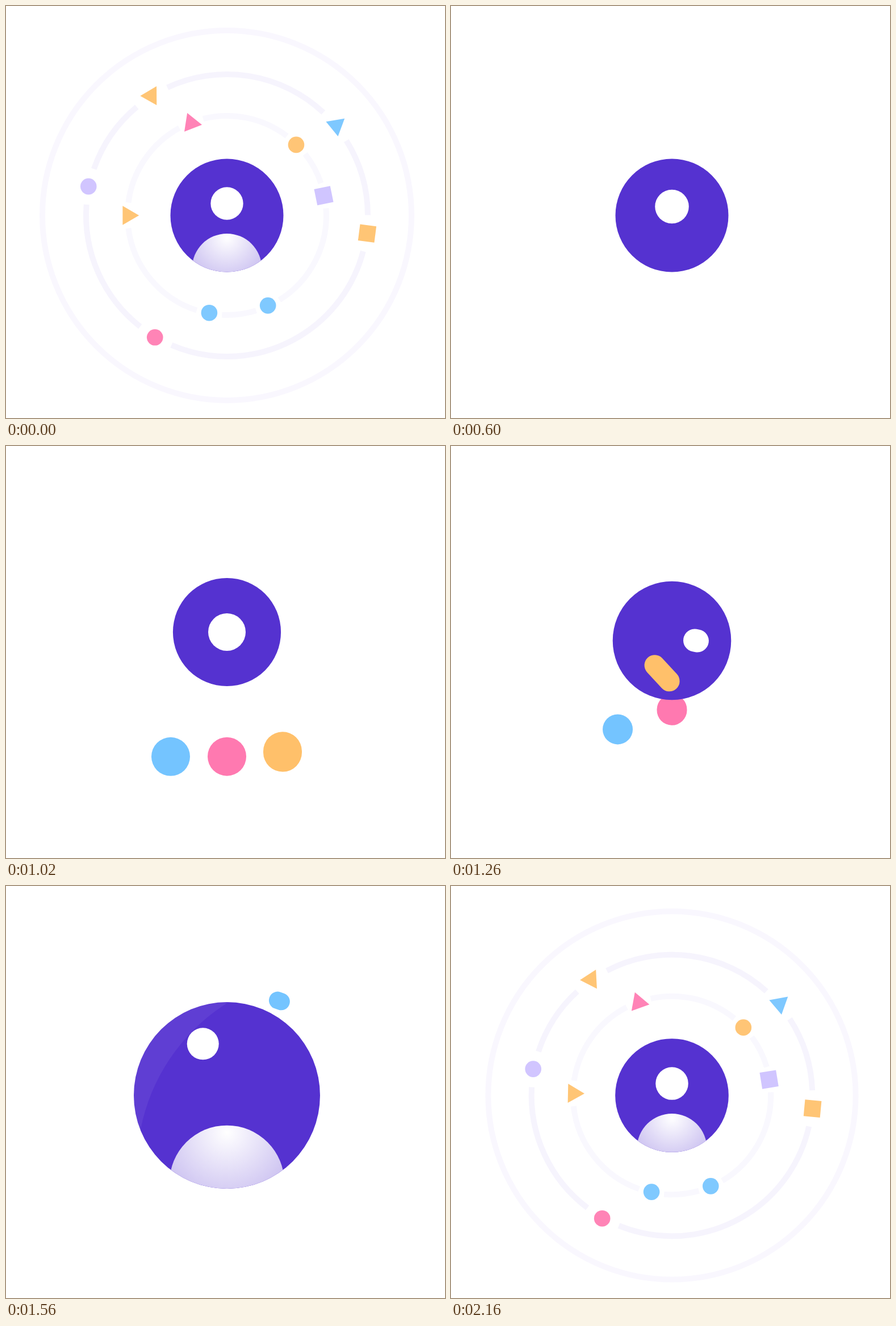
Recreate the animation shown at these times as an HTML page with a canvas. Size 773 px wide and 724 px high, loop 2220 ms.

```html
<!DOCTYPE html>
<html lang="en">
<head>
<meta charset="utf-8">
<title>Orbit loader</title>
<style>
html, body { margin: 0; width: 100%; height: 100%; overflow: hidden; background: #fff; }
canvas { display: block; }
</style>
</head>
<body>
<canvas id="stage" width="773" height="724"></canvas>
<script>
const ctx = document.getElementById('stage').getContext('2d');
const LOOP = 2220, STEP = 60;
const CX = 389, CY = 368, TAU = Math.PI * 2, RAD = Math.PI / 180;
const PURPLE = '#5532d0', YELLOW = '#ffc06a', PINK = '#ff79b0', BLUE = '#74c4ff', LILAC = '#cdc0ff';

const part = (t, from, to) => Math.min(Math.max((t - from) / (to - from), 0), 1);
const ramp = (t, from, to) => {
  const u = part(t, from, to);
  return u * u * (3 - 2 * u);
};
const mix = (a, b, u) => a + (b - a) * u;
const polar = (x, y, r, deg) => [x + r * Math.cos(deg * RAD), y + r * Math.sin(deg * RAD)];

// Orbit time: zero at the loop start, negative while the rings grow back.
const spin = t => {
  const u = t / 360;
  return u * (.75 - .637 * u + .887 * u * u);
};
const contract = t => t < 0 ? (t / 420) ** 2 : .15 * (t / 360) ** 2;

const rings = [
  { radius: 325, shrink: 72, alpha: .036, born: -510, gone: 480 },
  { radius: 248, shrink: 35, alpha: .052, born: -624, gone: 480 },
  { radius: 175, shrink: 37, alpha: .03, born: -720, gone: 330 }
];
const orbits = [null, { radius: 249, shrink: 17 }, { radius: 174, shrink: 30 }];
const radiusOf = (o, t) => o.radius - o.shrink * contract(t);

const shapes = [
  ['tri', YELLOW, 1, -122.4, 17.7, -410, 62],
  ['dot', LILAC, 1, 191.8, 7.1, -410],
  ['box', YELLOW, 1, 7.3, 13.4, -410],
  ['tri', BLUE, 1, -39.4, 6.4, -410],
  ['dot', PINK, 1, 120.6, 6.8, -435],
  ['tri', PINK, 2, -111.2, -9.7, -510],
  ['dot', YELLOW, 2, -45.5, -13.7, -410],
  ['box', LILAC, 2, -11.5, -15.2, -530],
  ['dot', BLUE, 2, 65.5, -8.9, -455],
  ['dot', BLUE, 2, 100.3, -11.3, -455],
  ['tri', YELLOW, 2, 180, -8.1, -475, 60]
].map(([kind, color, ring, angle, speed, born, turn = 0], i) =>
  ({ kind, color, ring, angle, speed, born, turn, pull: 360 + i * 3, fall: 170 }));
Object.assign(shapes[4], { pull: 69, fall: 330 });

const angleOf = (s, t) => s.angle + s.speed * spin(t);
const pullOf = (s, t) => 1 - part(t, s.pull, s.pull + s.fall) ** 1.5;
const placeOf = (s, t) => polar(CX, CY, radiusOf(orbits[s.ring], t) * pullOf(s, t), angleOf(s, t));

function disc(x, y, r, fill) {
  ctx.fillStyle = fill;
  ctx.beginPath();
  ctx.arc(x, y, r, 0, TAU);
  ctx.fill();
}

// A dot that stretches along its path once it moves fast enough.
function smear(path, t, r, color) {
  if (r <= 0) return;
  const [x, y] = path(t), a = path(t - 16), b = path(t + 16);
  const dx = b[0] - a[0], dy = b[1] - a[1], len = Math.hypot(dx, dy);
  const k = len > 13 ? (len - 13) / len / 2 : 0;
  ctx.strokeStyle = color;
  ctx.lineCap = 'round';
  ctx.lineWidth = r * 2;
  ctx.beginPath();
  ctx.moveTo(x - dx * k, y - dy * k);
  ctx.lineTo(x + dx * k + .02, y + dy * k);
  ctx.stroke();
}

function drawShape(s, t) {
  const alpha = .92 * part(t, s.born, s.born + 300) + .08 * part(t, 0, 300);
  const size = Math.min(1, pullOf(s, t) * 6);
  if (alpha <= 0 || size <= 0) return;
  ctx.globalAlpha = alpha;
  if (s.kind === 'dot') {
    smear(u => placeOf(s, u), t, 14.3 * size, s.color);
  } else {
    const [x, y] = placeOf(s, t), n = s.kind === 'tri' ? 3 : 4;
    const r = (n === 3 ? 19.2 : 20.4) * size * (t < 0 ? 1 + .33 * contract(t) : 1);
    const turn = angleOf(s, t) + s.turn + (n === 4 ? 45 : 0);
    ctx.fillStyle = s.color;
    ctx.beginPath();
    for (let i = 0; i < n; i++) ctx.lineTo(...polar(x, y, r, turn + i * 360 / n));
    ctx.fill();
  }
  ctx.globalAlpha = 1;
}

function drawRing(ring, index, t) {
  const alpha = ring.alpha * ramp(t, ring.born, ring.born + 300) * (1 - ramp(t, 0, ring.gone));
  if (alpha <= 0) return;
  const r = Math.max(radiusOf(ring, t), 0), gap = 7.4 * ramp(t, -420, -220);
  const stops = shapes.filter(s => s.ring === index)
    .map(s => (angleOf(s, t) + 720) % 360).sort((a, b) => a - b);
  ctx.strokeStyle = `rgba(85,50,206,${alpha})`;
  ctx.lineWidth = 10;
  ctx.lineCap = 'butt';
  ctx.beginPath();
  if (!stops.length || gap < .1) ctx.arc(CX, CY, r, 0, TAU);
  else stops.forEach((stop, i) => {
    const from = stop + gap, to = (stops[i + 1] ?? stops[0] + 360) - gap;
    if (to <= from) return;
    ctx.moveTo(...polar(CX, CY, r, from));
    ctx.arc(CX, CY, r, from * RAD, to * RAD);
  });
  ctx.stroke();
}

// The central disc hops up, then swells and settles.
const swell = t => t < 1560 ? ramp(t, 1200, 1560) : (1 - part(t, 1560, LOOP)) ** 2.2;
const discY = t => CY - 42 * ramp(t, 620, 1060) * (1 - ramp(t, 1050, 1550));
const discR = t => 99.5 + 64.5 * swell(t) - 4.5 * ramp(t, 600, 840) * (1 - ramp(t, 1000, 1240));

const settled = t => 1 - ramp(t, 480, 840) + ramp(t, 1580, 1820);
function headPath(t) {
  const out = 100 * ramp(t, 1140, 1407) * (1 - ramp(t, 1560, 1780));
  const lift = settled(t) * (21 - 16 * swell(t));
  return polar(CX, discY(t) - lift, out, -115 * ramp(t, 1260, 1560));
}
function headR(t) {
  const away = 33 - 13 * ramp(t, 1080, 1260) + 8 * ramp(t, 1260, 1560);
  return mix(away, .288 * discR(t), settled(t));
}

// Three balls drop out of the disc, bounce in a wave, and leave by their own routes.
const BALL = 34, REST = 524;
const shrinking = t => BALL - .0375 * Math.max(t - 1060, 0);
const balls = [
  { color: BLUE, x: 290, lag: 0, gone: 1640, front: t => t > 1350 && t < 1590,
    leave(t, p) {
      const u = ramp(t, 1250, 1580), join = ramp(t, 1080, 1240);
      const r = 183 + 8 * u - 28 * Math.sin(Math.PI * u);
      const q = polar(CX, discY(t), r, 121 + 180 * u);
      return [mix(p[0], q[0], join), mix(p[1], q[1], join)];
    },
    radius: shrinking },
  { color: PINK, x: 389, lag: 1.27, gone: 1400, front: () => false,
    leave: (t, p) => [p[0], mix(p[1], 380, ramp(t, 1046, 1526))],
    radius: shrinking },
  { color: YELLOW, x: 487, lag: 1.68, gone: 1380, front: t => t > 1100,
    leave(t, p) {
      const u = ramp(t, 1110, 1380);
      return [mix(p[0], 289, u), mix(p[1], 310, u)];
    },
    radius: t => BALL * (1 - part(t, 1110, 1380) ** 1.3) }
];

const emerge = (b, t) => ramp(t, 590 + b.lag * 40, 740 + b.lag * 40);
function ballPath(b, t) {
  const e = emerge(b, t), bounce = 27 * (1 - ramp(t, 1080, 1200));
  const y = REST - bounce * Math.cos((t - 840) * TAU / 300 - b.lag);
  return b.leave(t, [mix(CX, b.x, e), mix(380, y, e)]);
}
function drawBalls(t, front) {
  for (const b of balls) {
    if (t < 580 || t >= b.gone || b.front(t) !== front) continue;
    smear(u => ballPath(b, u), t, b.radius(t) * mix(.4, 1, emerge(b, t)), b.color);
  }
}

// A curved band of light sweeping across the disc.
function drawSheen(t, y, r) {
  if (t < 1500 || t > 1860) return;
  const lead = -1.05 + 2.97 * ((t - 1500) / 300) ** 1.38, big = 2.07 * r;
  ctx.fillStyle = 'rgba(255,255,255,.06)';
  ctx.beginPath();
  for (const edge of [lead - 1, lead]) {
    const [x, cy] = polar(CX, y, edge * r + big, 34.6);
    ctx.moveTo(x + big, cy);
    ctx.arc(x, cy, big, 0, TAU);
  }
  ctx.fill('evenodd');
}

function drawAvatar(t) {
  const y = discY(t), r = discR(t);
  const body = 1 - ramp(t, 400, 570) + ramp(t, 1380, 1530);
  disc(CX, y, r, PURPLE);
  ctx.save();
  ctx.beginPath();
  ctx.arc(CX, y, r, 0, TAU);
  ctx.clip();
  drawSheen(t, y, r);
  if (body > 0) {
    const br = .617 * r, by = y + r * (.938 + (1 - body) * .75), gy = by - br * .88;
    const shade = ctx.createRadialGradient(CX, gy, 0, CX, gy, br * 1.2);
    shade.addColorStop(0, '#fff');
    shade.addColorStop(1, '#cdc3f1');
    disc(CX, by, br, shade);
  }
  ctx.restore();
  smear(headPath, t, headR(t), '#fff');
}

function draw(t) {
  const orbit = t < 900 ? t : t - LOOP;
  ctx.fillStyle = '#fff';
  ctx.fillRect(0, 0, 773, 724);
  rings.forEach((ring, i) => drawRing(ring, i, orbit));
  if (orbit < 0) shapes.forEach(s => drawShape(s, orbit));
  drawBalls(t, false);
  drawAvatar(t);
  if (orbit >= 0) shapes.forEach(s => drawShape(s, orbit));
  drawBalls(t, true);
}

const start = performance.now();
function tick() {
  const t = (performance.now() - start) % LOOP;
  draw(Math.floor(t / STEP) * STEP);
  requestAnimationFrame(tick);
}
tick();
</script>
</body>
</html>
```
